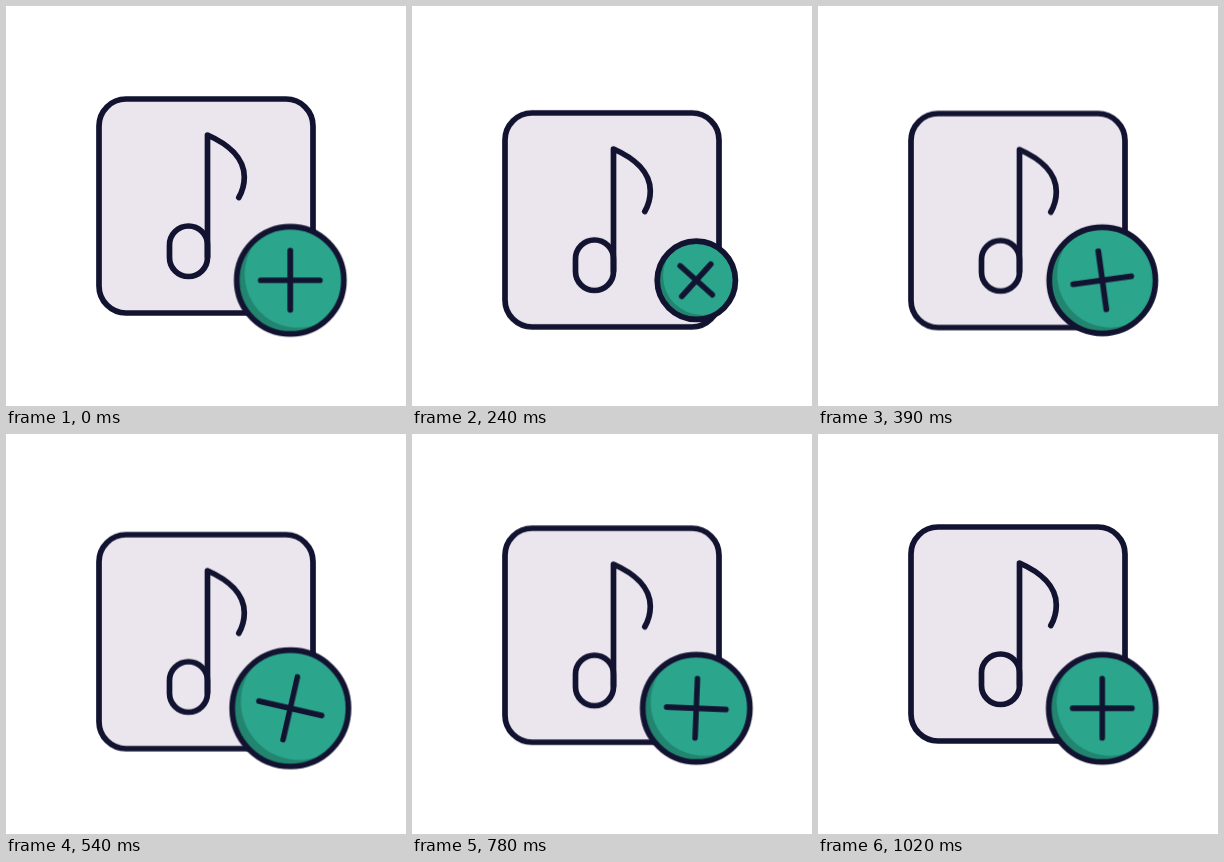
These frames come from a looping animation (400x400 px, 1050 ms). An HTML page:

```html
<!DOCTYPE html>
<html lang="en">
<head>
<meta charset="utf-8">
<title>Add music</title>
<style>
  html, body { margin: 0; width: 100%; height: 100%; overflow: hidden; background: #fff; }
  svg { display: block; width: 100%; height: 100%; }
  .line {
    fill: none; stroke: #121331; stroke-width: 5.7;
    stroke-linecap: round; stroke-linejoin: round;
    vector-effect: non-scaling-stroke;
  }
  #badge, #plus { transform-origin: 0 0; }
</style>
</head>
<body>
<svg viewBox="0 0 400 400">
  <defs>
    <clipPath id="disc"><circle r="53.6"/></clipPath>
  </defs>
  <g id="card">
    <rect class="line" x="93" y="93" width="214" height="214" rx="27" style="fill:#ebe6ed"/>
    <rect class="line" x="163.5" y="220" width="38" height="50.5" rx="19"/>
    <path class="line" d="M201.5 251V129C222 138 238.3 152 238.3 171C238.3 178.5 236.3 185.5 232.8 191.5"/>
  </g>
  <g transform="translate(284.3 274.3)">
    <g id="badge">
      <circle r="53.6" fill="#22856f"/>
      <g clip-path="url(#disc)"><circle cx="8" cy="-6" r="53.6" fill="#2ca58d"/></g>
      <circle class="line" r="53.6"/>
      <path id="plus" class="line" d="M0 -29.6V29.6M-29.6 0H29.6"/>
    </g>
  </g>
</svg>
<script>
  const LOOP = 1050;
  const SMOOTH = 'cubic-bezier(.333, 0, .667, 1)';
  const SETTLE = 'cubic-bezier(.333, 0, .22, 1)';

  // Each step: time in ms, value, easing towards the next step.
  function play(id, toTransform, steps) {
    const frames = steps.map(([time, value, easing = SMOOTH]) => ({
      offset: time / LOOP, transform: toTransform(value), easing
    }));
    document.getElementById(id).animate(frames, { duration: LOOP, iterations: Infinity })
      .startTime = start;
  }

  const start = document.timeline.currentTime || 0;

  play('card', y => `translateY(${y}px)`,
    [[0, 0], [300, 15.5, SETTLE], [1020, 0], [LOOP, 0]]);
  play('badge', s => `scale(${s})`,
    [[0, 1], [190, 0.7], [493, 1.095], [730, 1], [LOOP, 1]]);
  play('plus', a => `rotate(${a}deg)`,
    [[0, 0], [550, 103], [867, 90], [LOOP, 90]]);
</script>
</body>
</html>
```
